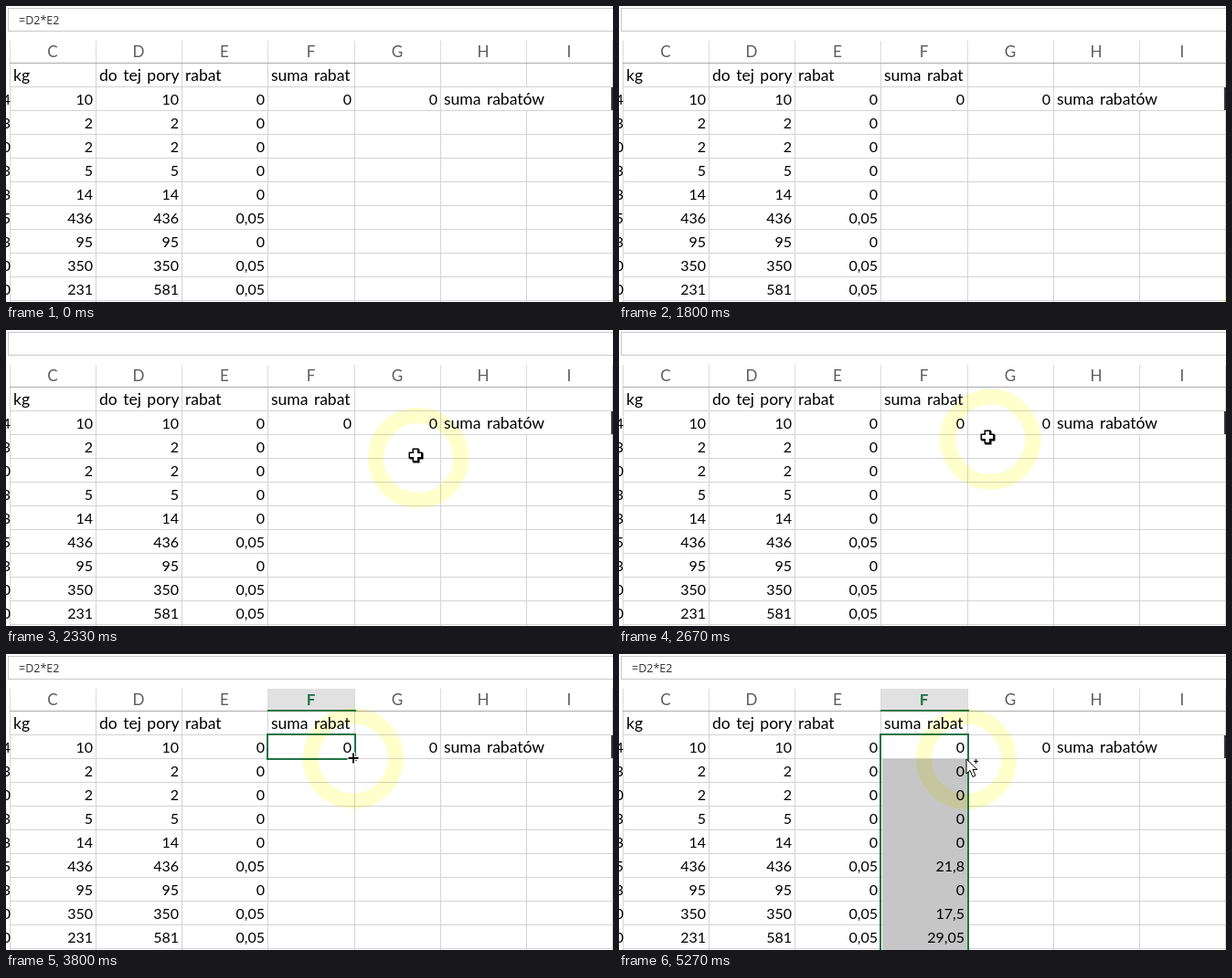
Write an HTML page with a canvas that moves like this. It is 664 px wide and 324 px high and loops after 5670 ms.

```html
<!DOCTYPE html>
<html lang="pl">
<head>
<meta charset="utf-8">
<style>
  html, body { margin: 0; width: 100%; height: 100%; overflow: hidden; background: #fff; }
  canvas { display: block; }
</style>
</head>
<body>
<canvas id="stage" width="664" height="324"></canvas>
<script>
const ctx = document.getElementById('stage').getContext('2d');
const LOOP = 5670, FPS = 15, ROW = 26, TOP = 62;
const GREEN = '#217346', GRID = '#d4d4d4';
const columns = [4, 98, 192, 286, 381, 475, 569, 663];

const kg = [10, 2, 2, 5, 14, 436, 95, 350, 231];
const soFar = [10, 2, 2, 5, 14, 436, 95, 350, 581];
const discount = soFar.map(n => n >= 300 ? 0.05 : 0);
const totals = soFar.map((n, i) => Math.round(n * discount[i] * 100) / 100);
const clipped = [...'430385300'];

const clamp = u => Math.max(0, Math.min(1, u));
const progress = (t, from, to) => clamp((t - from) / (to - from));
const sine = u => (1 - Math.cos(Math.PI * u)) / 2;
const easeOut = u => 1 - (1 - u) ** 3;
const mix = (a, b, u) => a.map((v, i) => v + (b[i] - v) * u);
const rowY = i => TOP + i * ROW;
const polish = n => String(n).replace('.', ',');

function rect(x, y, w, h, color) {
  ctx.fillStyle = color;
  ctx.fillRect(x, y, w, h);
}

function text(s, x, y, font, align = 'left', color = '#000') {
  ctx.font = font;
  ctx.textAlign = align;
  ctx.fillStyle = color;
  ctx.fillText(s, x, y);
}

const label = (s, x, row) => text(s, x, rowY(row) + 20, '17.5px Lato, sans-serif');
const number = (n, x, row) => text(polish(n), x, rowY(row) + 46, '16px Lato, sans-serif', 'right');

function drawSheet(t) {
  const formula = t < 730 || t >= 3070;
  const headerOn = t >= 70 && t < 730 || t >= 3070;
  const filled = t >= 4670;

  rect(0, 0, 664, 324, '#fff');
  ctx.lineWidth = 1;
  ctx.strokeStyle = '#c8c8c8';
  ctx.strokeRect(2.5, 2.5, 670, 25);
  if (formula) text('=D2*E2', 14, 20, '12.5px "Open Sans", sans-serif', 'left', '#333');

  if (headerOn) rect(287, 38, 94, 24, '#e1e1e1');
  columns.forEach((x, i) => {
    rect(x, 38, 1, 24, '#dcdcdc');
    rect(x, TOP, 1, 262, GRID);
    if (i === 7) return;
    const active = headerOn && i === 3;
    text('CDEFGHI'[i], (x + columns[i + 1]) / 2, 56,
      `${active ? 'bold ' : ''}17px Lato, sans-serif`, 'center', active ? GREEN : '#5c5c5c');
  });
  for (let i = 0; i <= 10; i++) rect(4, rowY(i), 660, 1, i ? GRID : '#ababab');
  rect(569, 89, 1, 25, '#fff');
  rect(662, 89, 2, 25, '#333');

  const bottom = filled ? 115 + 420 * progress(t, 4600, 4800) : 115;
  if (filled) rect(288, 115, 93, bottom - 115, '#c6c6c6');

  label('kg', 8, 0);
  label('do tej pory', 102, 0);
  label('rabat', 196, 0);
  label('suma rabat', 290, 0);
  label('suma rabatów', 479, 1);
  kg.forEach((n, i) => {
    number(clipped[i], 5, i);
    number(n, 95, i);
    number(soFar[i], 189, i);
    number(discount[i], 283, i);
    if (!i || filled) number(totals[i], 378, i);
  });
  number(0, 472, 0);

  if (headerOn) drawSelection(t, bottom);
}

function drawSelection(t, bottom) {
  const away = t < 3000 ? 0 : (1 - progress(t, 3070, 3220)) ** 2;
  const x = Math.round(205 * away), y = Math.round(67 * away);
  ctx.globalAlpha = t < 130 ? 0.5 : 1;
  rect(286 + x, 61, 97, 2, GREEN);
  ctx.strokeStyle = GREEN;
  ctx.lineWidth = 2;
  ctx.strokeRect(286 + x, 88 + y, 96, bottom - 88);
  rect(379 + x, bottom - 3 + y, 6, 6, '#fff');
  rect(380 + x, bottom - 2 + y, 4, 4, GREEN);
  ctx.globalAlpha = 1;
}

function pointerAt(t) {
  const start = [712, 365], middle = [451, 140], cell = [377, 106.5], corner = [380, 115];
  if (t <= 2330) return mix(start, middle, sine(progress(t, 1730, 2330)));
  if (t <= 3530) return mix(middle, cell, sine(progress(t, 2330, 2930)));
  return mix(cell, corner, easeOut(progress(t, 3530, 4000)));
}

function circle(x, y, r, width, color) {
  ctx.beginPath();
  ctx.arc(x, y, r, 0, 2 * Math.PI);
  ctx.lineWidth = width;
  ctx.strokeStyle = color;
  ctx.stroke();
}

function plus(arm, half) {
  ctx.beginPath();
  ctx.rect(-arm, -half, 2 * arm, 2 * half);
  ctx.rect(-half, -arm, 2 * half, 2 * arm);
  ctx.fill();
}

function drawCellCursor() {
  ctx.translate(1, 1);
  ctx.fillStyle = '#000';
  plus(7.5, 3.5);
  ctx.translate(-1, -1);
  plus(7.5, 3.5);
  ctx.fillStyle = '#fff';
  plus(6, 2);
}

function drawFillCursor() {
  ctx.fillStyle = '#fff';
  plus(6.5, 2);
  ctx.fillStyle = '#000';
  plus(5.5, 1);
}

function drawArrow() {
  const arrow = new Path2D('M0 0V16L4 12.5L7 19.5L10 18L7 11.5H12Z');
  ctx.fillStyle = '#fff';
  ctx.fill(arrow);
  ctx.strokeStyle = '#000';
  ctx.lineWidth = 1;
  ctx.stroke(arrow);
  ctx.translate(10.5, 2.5);
  ctx.fillStyle = '#000';
  plus(2.5, 0.5);
}

function drawPointer(t) {
  if (t < 1800) return;
  const [x, y] = pointerAt(t);
  const thick = t < 3730;
  const cx = thick ? x - 3.5 : x, cy = thick ? y - 3 : y;

  ctx.save();
  ctx.globalCompositeOperation = 'multiply';
  circle(x, y, 46.5, 17, '#ffffcc');
  ctx.restore();

  const click = [4530, 4330, 3000].find(start => t >= start);
  const radius = 50 * (1 - sine(progress(t, click, click + 740)));
  if (click && radius > 0.5) {
    circle(thick ? x - 2 : x - 0.5, thick ? y - 2 : y - 0.5, radius, 3, 'rgba(245,150,100,.52)');
  }

  ctx.save();
  ctx.translate(Math.round(cx), Math.round(cy));
  if (thick) drawCellCursor();
  else if (t < 4930) drawFillCursor();
  else drawArrow();
  ctx.restore();
}

function frame(now) {
  const step = Math.floor((now % LOOP + 3.4) * FPS / 1000);
  const t = Math.round(step * 100 / FPS) * 10;
  ctx.wordSpacing = '2px';
  drawSheet(t);
  drawPointer(t);
  requestAnimationFrame(frame);
}

const began = performance.now();
requestAnimationFrame(function tick() {
  frame(Math.max(0, performance.now() - began));
});
</script>
</body>
</html>
```
